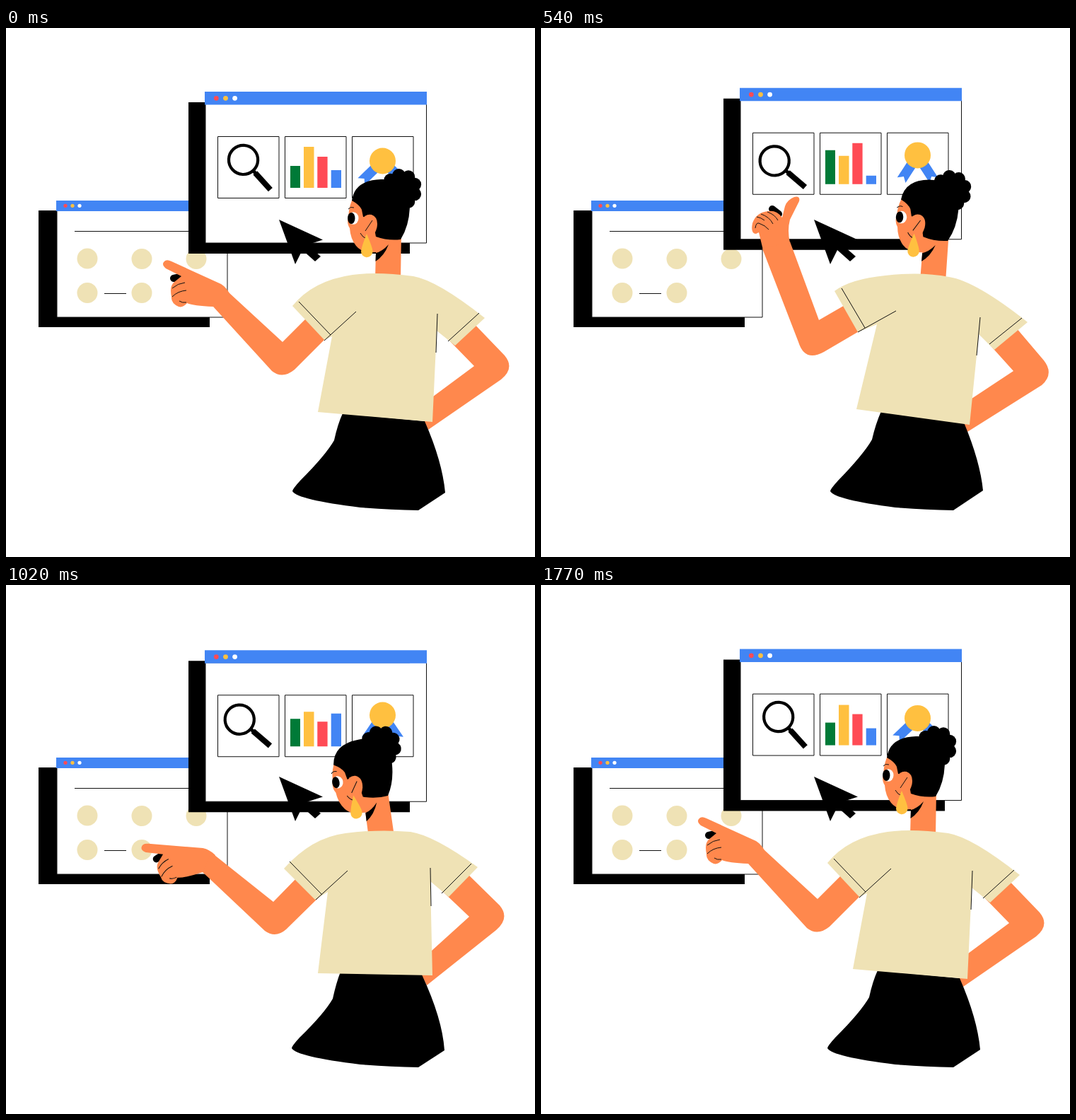
Animation, 748 px wide and 748 px high, one loop 1800 ms. Source, as an HTML page:

```html
<!DOCTYPE html>
<html lang="en">
<head>
<meta charset="utf-8">
<title>Presenter with windows</title>
<style>
  html, body { margin: 0; height: 100%; overflow: hidden; background: #fff; }
  svg { display: block; width: 100vw; height: 100vh; }
  .blue { fill: #4285f4; }
  .yellow { fill: #ffc040; }
  .red { fill: #ff4b55; }
  .green { fill: #007a37; }
  .white { fill: #fff; }
  .cream { fill: #efe2b5; }
  .skin { fill: #ff884d; }
  .thin { fill: none; stroke: #111; stroke-width: 1; }
  .marker { fill: none; stroke: #000; stroke-width: 10; stroke-linecap: round; }
</style>
</head>
<body>
<svg viewBox="0 0 748 748">
  <g id="backWindow">
    <path d="M46 258H288V423H46Z"/>
    <path class="white" d="M72 258H313V409H72Z"/>
    <path class="thin" d="M72 258V409H313V258M97 287.5H290M139 375.5H170"/>
    <path class="blue" d="M71 244H313V259H71Z"/>
    <circle class="red" cx="84" cy="251.3" r="2.6"/>
    <circle class="yellow" cx="94" cy="251.3" r="2.6"/>
    <circle class="white" cx="104" cy="251.3" r="2.6"/>
    <g class="cream">
      <circle cx="115" cy="326" r="14.5"/>
      <circle cx="192" cy="326.5" r="14.5"/>
      <circle cx="269" cy="326.5" r="14.5"/>
      <circle cx="115" cy="374.5" r="14.5"/>
      <circle cx="192" cy="374.5" r="14.5"/>
    </g>
  </g>

  <g id="frontWindow">
    <path d="M258 105H571V319H258Z"/>
    <path class="white" d="M282 108H594.5V304H282Z"/>
    <path class="thin" d="M282 108V304H594.5V108M299.5 153.5h86.5v87h-86.5zM394.5 153.5h86.5v87h-86.5zM489.5 153.5h86.5v87h-86.5z"/>
    <path class="blue" d="M281 90H595V108.5H281Z"/>
    <circle class="red" cx="297.3" cy="99.3" r="3.4"/>
    <circle class="yellow" cx="310.5" cy="99.3" r="3.4"/>
    <circle class="white" cx="323.6" cy="99.3" r="3.4"/>
    <g id="bars">
      <rect class="green" x="402" width="14"/>
      <rect class="yellow" x="421" width="14.5"/>
      <rect class="red" x="440.3" width="14.3"/>
      <rect class="blue" x="459.7" width="14.3"/>
    </g>
    <g id="medal">
      <path class="blue ribbon" d="M-7 0V42L0 36L7 42V0Z"/>
      <path class="blue ribbon" d="M-7 0V42L0 36L7 42V0Z"/>
      <circle class="yellow" r="18.5"/>
    </g>
  </g>

  <g id="lens" fill="none" stroke="#000">
    <circle r="20.6" stroke-width="4.2"/>
    <path d="M21 0H26" stroke-width="5"/>
    <path d="M25 0H57" stroke-width="8"/>
  </g>
  <path d="M386 271L448 299.5L426 306.5L445 323L437 330L419 314L409 334Z"/>

  <path id="rightArm" class="skin"/>
  <path id="skirt"/>
  <g id="hand">
    <g id="pointing">
      <path class="marker" d="M237 354L246 352"/>
      <path class="skin" d="M223 331Q226 326 234 330L304 362Q312 367 317 377L309 392L293 394Q265 393 256 389Q250 396 244 394Q233 389 234 380Q231 366 237 360L248 351L226 340Q220 335 223 331Z"/>
      <path class="thin" d="M235 368Q243 361 253 360M235 380Q243 372 255 371M245 386Q249 389 255 388"/>
    </g>
    <g id="raised">
      <path class="marker" d="M327 256L336 263"/>
      <path class="skin" d="M352 304Q348 286 352 271L365 245Q367 237 358 239Q348 243 345 252L341 268Q333 257 321 259Q304 261 299 276Q296 291 304 291L308 289L314 314L335 316Z"/>
      <path class="thin" d="M320 260Q331 264 335 272M311 263Q323 267 328 277M303 283Q304 275 308 276Q317 279 322 285M305 267Q311 268 316 272"/>
    </g>
  </g>
  <path id="leftArm" class="skin"/>

  <g id="head">
    <path class="skin" d="M493 236Q485 250 484.5 264Q481 276 486 283Q487 298 495 308Q504 319 523 317L522 354H558L559 290L540 250Z"/>
    <path d="M541 306Q532 316 523 318L522.5 330Q535 322 541 306Z"/>
    <path d="M489 244Q493 215 530 214Q571 213 571 253Q570 280 558 299Q540 301 523 295L518 268L505 267L503 257Q500 250 489 244Z"/>
    <g id="bun"><circle cx="559" cy="228" r="24.5"/></g>
    <path class="skin" d="M503 272Q508 262 517 264Q527 268 524.5 282Q520 299 508 298L500 285Z"/>
    <path class="thin" d="M518 272L508 287M501 290Q504 296 510 298M484 256Q487 252 492 254"/>
    <g id="eye">
      <ellipse class="white" cx="491" cy="269" rx="7.5" ry="8.7"/>
      <ellipse cx="488.3" cy="269" rx="5.2" ry="8"/>
    </g>
    <path class="yellow" d="M510 291Q518.5 311 518.5 316A8.2 8.2 0 0 1 502 316Q503 308 510 291Z"/>
  </g>

  <path id="shirt" class="cream"/>
  <path id="seams" class="thin"/>
</svg>
<script>
const LOOP = 1800, STEP = 30;
const $ = id => document.getElementById(id);
const lerp = (a, b, k) => a + (b - a) * k;
const linear = k => k;
const easeInOut = k => k < .5 ? 4 * k ** 3 : 1 - 4 * (1 - k) ** 3;

// Outlines for three poses: neutral, leaning right, leaning left.
const arm = [
  'M434 401L391 444L315 374L293 394L376 485Q391 497 408 483L460 431Z',
  'M438 387L393 413L352 302L313 312L364 444Q373 473 400 458L458 424Z',
  'M420 405L378 448L290 378L278 406L366 489Q381 500 396 487L447 437Z'];
const body = {
  rightArm: [
    'M655 411L705 463Q720 481 700 497L597 568L585 545L604 521L662 478L625 440Z',
    'M666 417L711 470Q726 489 708 505L603 571L590 548L609 524L668 485L631 444Z',
    'M648 404L698 453Q713 471 693 488L595 566L583 543L602 517L655 469L616 432Z'],
  skirt: [
    'M476 545Q469 560 464 583Q452 604 416 640Q405 652 405 655Q412 667 501 678Q540 681 583 682L621 657Q617 613 592 556Z',
    'M481 542Q473 560 468 582Q456 603 420 640Q409 652 409 655Q416 667 501 678Q540 681 583 682L625 654Q621 613 598 558Z',
    'M473 547Q467 562 462 585Q450 606 415 640Q404 652 404 655Q411 667 501 678Q540 681 583 682L620 658Q617 613 588 551Z'],
  shirt: [
    'M405 393Q434 357 490 349Q524 344 576 351Q610 357 677 410L635 449L609 428L603 557L441 543L461 436L450 441Z',
    'M415 372Q437 355 487 350Q537 344 577 352Q615 358 688 416L641 455L619 433L606 561L446 539L475 419L448 430Z',
    'M393 401Q432 357 480 351Q525 345 572 349Q605 354 667 399L626 441L600 419L603 552L441 549L455 434L437 445Z'],
  seams: [
    'M414 387L459 434M450 442L495 401M610 404L608 459M669 403L625 443',
    'M425 368L458 424M448 430L502 400M621 409L616 463M680 410L634 447',
    'M401 391L447 438M438 445L483 404M600 400L601 454M658 394L616 436']
};
const wrists = [[303, 384], [332, 307], [285, 393]];
const RAISED = 81;

const leanTrack = [[0, 0], [195, 0], [480, 1], [600, 1], [840, -1], [1050, -1], [1200, 0], [LOOP, 0]];
// The arm starts later than the body and arrives before it.
const armTrack = [[0, 0], [270, 0], [480, 1], [600, 1], [840, -1], [1050, -1], [1140, .05], [1230, 0], [LOOP, 0]];
const handTrack = [[0, 0], [270, 0], [480, RAISED], [600, RAISED], [840, -20], [1050, -20], [1140, 21], [1230, 0], [LOOP, 0]];
const barTimes = [0, 270, 540, 900, 1140, 1440, 1770, LOOP];
const barTracks = [
  [31, 42, 48, 35, 43, 48, 32, 31],
  [58, 47, 40, 53, 45, 41, 57, 58],
  [44, 54, 58, 25, 45, 60, 44, 44],
  [25, 14, 12, 62, 31, 8, 24, 25]
].map(heights => heights.map((h, i) => [barTimes[i], h]));
const blinks = [[225, 315], [1095, 1185]];

function at(track, t, ease = easeInOut) {
  const i = track.findIndex(k => k[0] > t);
  const [t0, v0] = track[i - 1], [t1, v1] = track[i];
  return lerp(v0, v1, ease((t - t0) / (t1 - t0)));
}

function morph([rest, right, left], lean) {
  const goal = (lean > 0 ? right : left).match(/\d+/g);
  let i = 0;
  return rest.replace(/\d+/g, n => lerp(+n, +goal[i++], Math.abs(lean)).toFixed(2) + ' ');
}

const move = (id, value) => $(id).setAttribute('transform', value);
const show = (id, on) => $(id).setAttribute('visibility', on ? 'visible' : 'hidden');

for (let i = 0; i < 9; i++) {
  const curl = $('bun').firstElementChild.cloneNode();
  const a = i * Math.PI * 2 / 9 - .35;
  curl.setAttribute('cx', 559 + 20 * Math.cos(a));
  curl.setAttribute('cy', 228 + 20 * Math.sin(a));
  curl.setAttribute('r', 9.3);
  $('bun').append(curl);
}

function drawWindow(t) {
  const wave = deg => Math.cos((t / LOOP * 360 + deg) * Math.PI / 180);
  move('frontWindow', `translate(0 ${5.5 * wave(90)})`);
  [...$('bars').children].forEach((bar, i) => {
    const h = at(barTracks[i], t, linear);
    bar.setAttribute('y', 226 - h);
    bar.setAttribute('height', h);
  });
  move('medal', `translate(532.5 ${185 + 3.2 * wave(-20)})`);
  const spread = 39 + 8 * wave(30);
  document.querySelectorAll('.ribbon').forEach((r, i) =>
    r.setAttribute('transform', `rotate(${i ? -spread : spread})`));
  move('lens', `translate(${332.5 + 3.4 * wave(25)} ${188.2 - 2 * wave(-27)}) rotate(${43.7 + 4.5 * wave(25)})`);
}

function drawBody(t) {
  const lean = at(leanTrack, t), amount = Math.abs(lean);
  for (const id in body) $(id).setAttribute('d', morph(body[id], lean));

  const [dx, dy, tilt] = lean > 0 ? [15.5, 1, 3] : [-13, 1.4, -9];
  move('head', `translate(${dx * amount} ${dy * amount}) rotate(${tilt * amount} 540 330)`);
  show('eye', !blinks.some(([from, to]) => t >= from && t < to));
}

function drawArm(t) {
  const swing = at(armTrack, t), turn = at(handTrack, t);
  $('leftArm').setAttribute('d', morph(arm, swing));

  const goal = wrists[swing > 0 ? 1 : 2];
  const [x, y] = wrists[0].map((v, i) => lerp(v, goal[i], Math.abs(swing)));
  const raised = turn > RAISED / 2;
  const [px, py] = wrists[raised ? 1 : 0];
  move('hand', `translate(${x} ${y}) rotate(${raised ? turn - RAISED : turn}) translate(${-px} ${-py})`);
  show('pointing', !raised);
  show('raised', raised);
}

const start = performance.now();
function frame() {
  const t = Math.floor((performance.now() - start) % LOOP / STEP) * STEP;
  drawWindow(t);
  drawBody(t);
  drawArm(t);
  requestAnimationFrame(frame);
}
frame();
</script>
</body>
</html>
```
